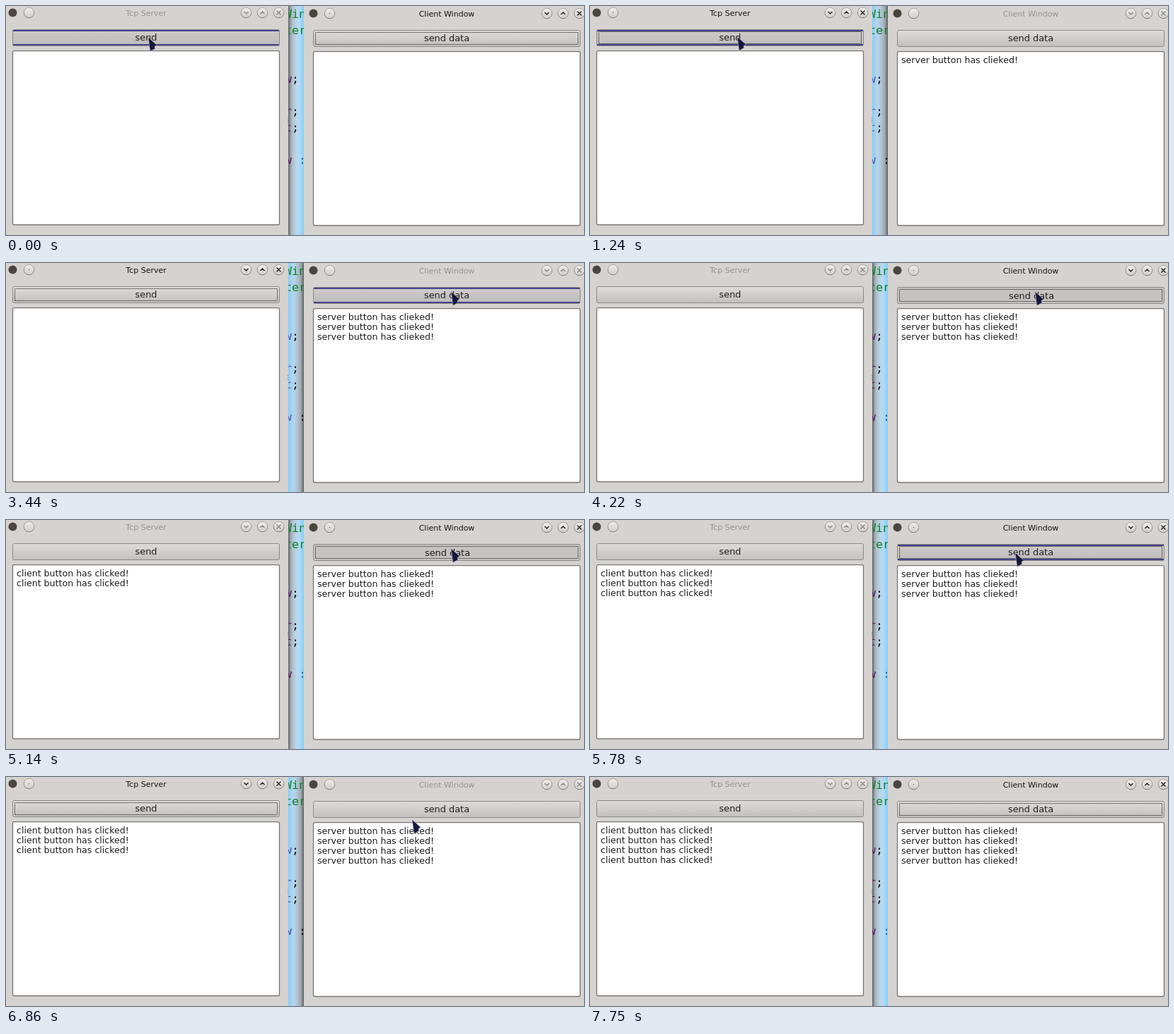
Recreate the animation shown at these times as an HTML page. Size 817x325 px, loop 8410 ms.

```html
<!DOCTYPE html>
<html lang="en">
<head>
<meta charset="utf-8">
<title>Server and client windows</title>
<style>
html, body { margin: 0; width: 100%; height: 100%; overflow: hidden; background: #d6d2cf; }
svg { display: block; width: 817px; height: 325px; font-family: "DejaVu Sans", sans-serif; }
.code { font: 16.6px "DejaVu Sans Mono", monospace; }
.title { font-size: 11px; text-anchor: middle; }
.label { font-size: 12.9px; text-anchor: middle; fill: #1c1c1c; }
.line { font-size: 12.6px; fill: #1c1c1c; }
</style>
</head>
<body>
<svg id="stage" viewBox="0 0 817 325">
  <defs>
    <linearGradient id="face" x2="0" y2="1">
      <stop stop-color="#dedbd8"/><stop offset="1" stop-color="#c2bfbc"/>
    </linearGradient>
    <linearGradient id="hoverFace" x2="0" y2="1">
      <stop stop-color="#cfccca"/><stop offset="1" stop-color="#bdbabb"/>
    </linearGradient>
    <linearGradient id="round" x2="0" y2="1">
      <stop stop-color="#efeeec"/><stop offset="1" stop-color="#cfccc9"/>
    </linearGradient>
    <linearGradient id="rim" x2="0" y2="1">
      <stop stop-color="#a8a5a2"/><stop offset="1" stop-color="#7b7876"/>
    </linearGradient>
    <linearGradient id="glow">
      <stop stop-color="#7fcbf8" stop-opacity=".95"/>
      <stop offset=".3" stop-color="#a5d9fa" stop-opacity=".7"/>
      <stop offset="1" stop-color="#c0dcf0" stop-opacity="0"/>
    </linearGradient>
    <linearGradient id="shade">
      <stop stop-color="#303030" stop-opacity=".75"/>
      <stop offset=".2" stop-color="#555" stop-opacity=".4"/>
      <stop offset=".6" stop-color="#777" stop-opacity=".1"/>
      <stop offset="1" stop-color="#888" stop-opacity="0"/>
    </linearGradient>
  </defs>
</svg>
<script>
const LOOP = 8410, PRESS = 120;

// [time, x, y] of the pointer; it jumps from place to place
const POINTER = [
  [0, 200, 44], [500, 204, 44], [620, 207, 43],
  [3050, 300, 48], [3170, 500, 50], [3290, 626, 46], [3440, 628, 40],
  [5510, 622, 41], [5630, 618, 42],
  [5780, 600, 46], [5900, 545, 50], [6020, 465, 54], [6140, 395, 56],
  [6260, 340, 54], [6380, 310, 52], [6500, 298, 48],
  [6740, 430, 56], [6860, 573, 60], [6980, 602, 47],
  [7490, 700, 170], [7610, 792, 300], [7750, -50, -50]
];
const CLICKS = [
  [1120, "server"], [4220, "client"], [5140, "client"], [6500, "server"], [7250, "client"]
];

const stage = document.getElementById("stage");

function add(parent, tag, attrs, text) {
  const node = document.createElementNS("http://www.w3.org/2000/svg", tag);
  for (const key in attrs) node.setAttribute(key, attrs[key]);
  if (text) node.textContent = text;
  parent.appendChild(node);
  return node;
}
const set = (node, key, value) => node.setAttribute(key, value);
const show = (node, on) => set(node, "visibility", on ? "visible" : "hidden");

// Strip of the code editor between the windows; the active window's glow tints it
function makeEditor() {
  add(stage, "rect", { x: 396, width: 30, height: 325, fill: "#d5e1ec" });
  const edge = (x, dir) => add(stage, "rect", {
    width: 22, height: 325, transform: `translate(${x}) scale(${dir} 1)`
  });
  const left = edge(399, 1), right = edge(421, -1);
  const code = (row, x, text, fill) =>
    add(stage, "text", { class: "code", x, y: 17 + 23 * row, fill }, text);
  code(0, 394, "Win", "#118028");
  code(1, 394, "ter", "#118028");
  const names = [[4, "w"], [6, "r"], [7, "t"], [9, "w"]].map(([row, text]) => code(row, 394, text));
  [4, 6, 7].forEach(row => code(row, 404, ";", "#111"));
  const colon = code(9, 414, ":");

  return serverOn => {
    set(left, "fill", serverOn ? "url(#glow)" : "url(#shade)");
    set(right, "fill", serverOn ? "url(#shade)" : "url(#glow)");
    names.forEach(name => set(name, "fill", serverOn ? "#4a50b4" : "#5d1464"));
    set(colon, "fill", serverOn ? "#111" : "#1f6a94");
  };
}

function makeWindow(dx, dy, title, label, message, times) {
  const g = add(stage, "g", { transform: `translate(${dx} ${dy})` });
  add(g, "rect", { x: -4, y: -1, width: 403, height: 340, rx: 4, fill: "#d6d2cf" });
  add(g, "circle", { cx: 9.5, cy: 9.5, r: 6, fill: "#4a453f" });
  for (const cx of [32.5, 339.5, 362.5, 385.5])
    add(g, "circle", { cx, cy: 9.5, r: 7.3, fill: "url(#round)", stroke: "url(#rim)" });
  const dot = add(g, "circle", { cx: 32.5, cy: 9.5, r: .8, fill: "#666" });
  const icons = add(g, "path", {
    d: "M336.5 8l3 3 3-3M359.5 11l3-3 3 3M382.5 6.5l6 6m0-6l-6 6",
    fill: "none", "stroke-width": 1.5
  });
  const caption = add(g, "text", { class: "title", x: 198, y: 13.5 }, title);

  const face = add(g, "rect", { x: 9.5, y: 33.5, width: 377, height: 23, rx: 2, stroke: "#8b8885" });
  const hover = add(g, "path", { d: "M10 35H386M10 55H386", stroke: "#46458e", "stroke-width": 2 });
  const focus = add(g, "rect", {
    x: 12.5, y: 36.5, width: 371, height: 17, fill: "none", stroke: "#111",
    "stroke-dasharray": "1 1", "stroke-dashoffset": .5
  });
  const text = add(g, "text", { class: "label", x: 198, y: 49 }, label);

  add(g, "rect", { x: 9.5, y: 63.7, width: 377, height: 246.8, rx: 2, fill: "#fff", stroke: "#777472", "stroke-width": 1.3 });
  const lines = times.map((_, i) =>
    add(g, "text", { class: "line", x: 15, y: 80 + 14 * i }, message));

  return (t, active, pressed, px, py) => {
    const x = px - dx, y = py - dy;
    const over = !pressed && x >= 10 && x <= 386 && y >= 34 && y <= 57;
    set(caption, "fill", active ? "#151515" : "#959290");
    set(icons, "stroke", active ? "#252525" : "#8b8886");
    show(dot, active);
    show(focus, active);
    show(hover, over);
    set(face, "fill", pressed ? "#c5c2bf" : over ? "url(#hoverFace)" : "url(#face)");
    set(text, "transform", pressed ? "translate(1 1)" : "");
    lines.forEach((line, i) => show(line, t >= times[i]));
  };
}

const editor = makeEditor();
const server = makeWindow(0, 0, "Tcp Server", "send",
  "client button has clicked!", [4340, 4710, 5260, 7370]);
const client = makeWindow(425, 1, "Client Window", "send data",
  "server button has clieked!", [1240, 2680, 2930, 6620]);
add(stage, "path", { d: "M398.5 159v7", stroke: "#777", "stroke-dasharray": "1 2" });
const pointer = add(stage, "path", {
  d: "M1 .5L13.3 11.5 10 13.5 10.8 16.5 3.8 20.3Z",
  fill: "#15183a", stroke: "#b9bac6", "stroke-width": .6, "stroke-linejoin": "round"
});

function render(t) {
  const last = list => list.filter(item => item[0] <= t).pop();
  const [, x, y] = last(POINTER);
  const [clicked, active] = last(CLICKS) || [-PRESS, "client"];
  const pressed = t - clicked < PRESS ? active : "";
  const serverOn = active === "server";
  editor(serverOn);
  server(t, serverOn, pressed === "server", x, y);
  client(t, !serverOn, pressed === "client", x, y);
  set(pointer, "transform", `translate(${x} ${y})`);
}

const start = performance.now();
function tick() {
  render((performance.now() - start) % LOOP);
  requestAnimationFrame(tick);
}
tick();
</script>
</body>
</html>
```
